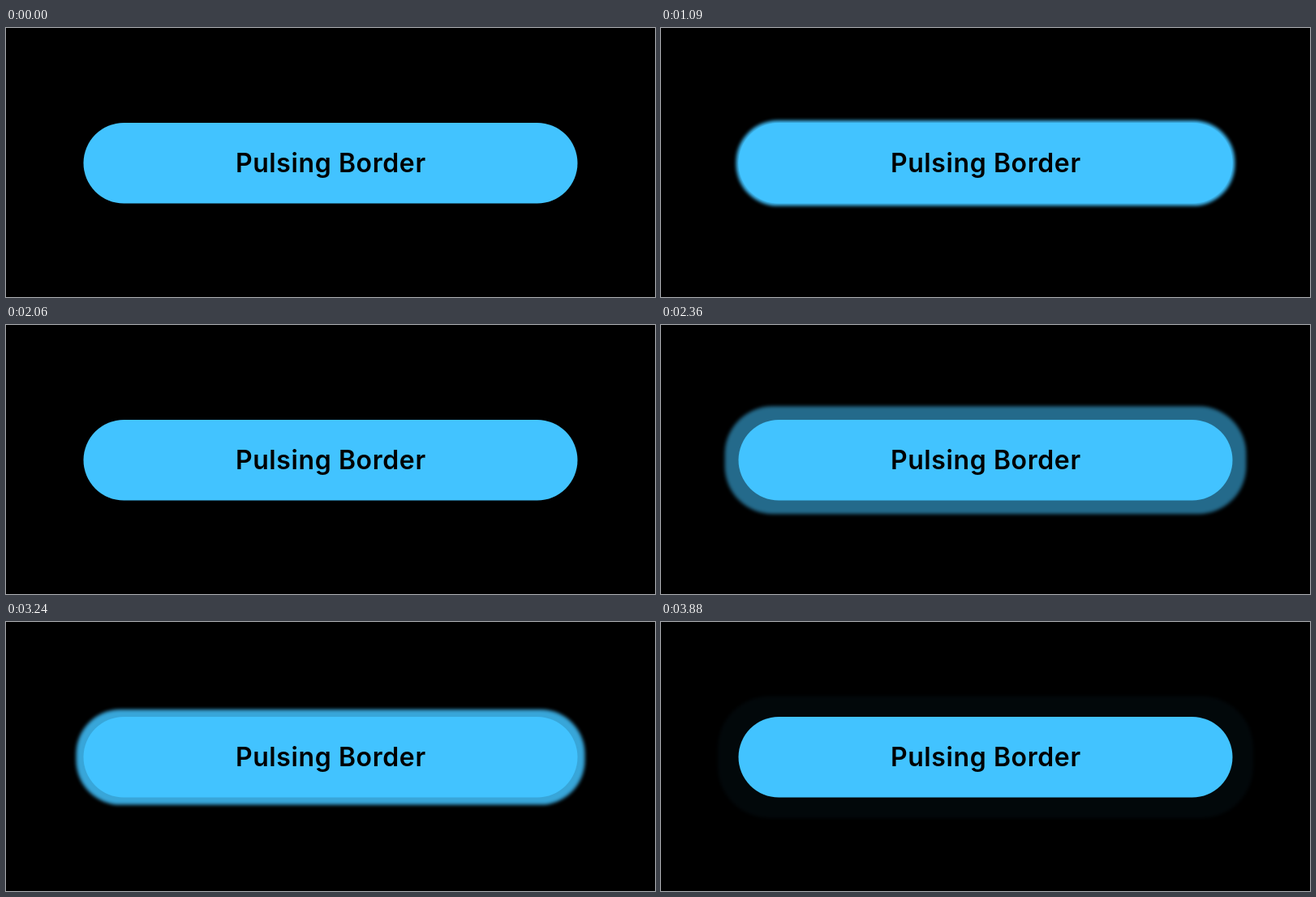
Write an HTML page that moves like this. It is 800 px wide and 332 px high and loops after 3.91 s.

```html
<!DOCTYPE html>
<html lang="en">
<head>
<meta charset="utf-8">
<title>Pulsing Border</title>
<style>
  html, body { margin: 0; width: 100%; height: 100%; overflow: hidden; background: #000; }
  svg { display: block; width: 800px; height: 332px; }
  rect { fill: #42c3ff; }
  #ring { filter: blur(2px); }
  text { font: 600 32px Inter, Roboto, sans-serif; letter-spacing: .6px; text-anchor: middle; }
</style>
</head>
<body>
<svg viewBox="0 0 800 332">
  <rect id="ring"/>
  <rect x="95.5" y="117" width="609" height="99.5" rx="49.75"/>
  <text x="400.3" y="178">Pulsing Border</text>
</svg>
<script>
const LOOP = 3910, PULSE = 1024, DELAY = 35, REACH = 26;
const ring = document.getElementById('ring');

// CSS "ease": cubic-bezier(.25, .1, .25, 1), solved by bisection
const bezier = (a, b, u) => 3 * a * u * (1 - u) ** 2 + 3 * b * u * u * (1 - u) + u ** 3;
function ease(x) {
  let lo = 0, hi = 1;
  for (let i = 0; i < 24; i++) {
    const mid = (lo + hi) / 2;
    if (bezier(.25, .25, mid) < x) lo = mid; else hi = mid;
  }
  return bezier(.1, 1, lo);
}

function draw(time) {
  const phase = (time % LOOP - DELAY + PULSE) % PULSE / PULSE;
  const progress = ease(phase);
  const spread = REACH * progress ** .55;
  const box = {
    x: 95.5 - spread,
    y: 117 - spread,
    width: 609 + 2 * spread,
    height: 99.5 + 2 * spread,
    rx: 49.75 + .55 * spread,
    opacity: 1 - progress
  };
  for (const key in box) ring.setAttribute(key, box[key]);
}

const start = performance.now();
function tick() {
  draw(performance.now() - start);
  requestAnimationFrame(tick);
}
tick();
</script>
</body>
</html>
```
